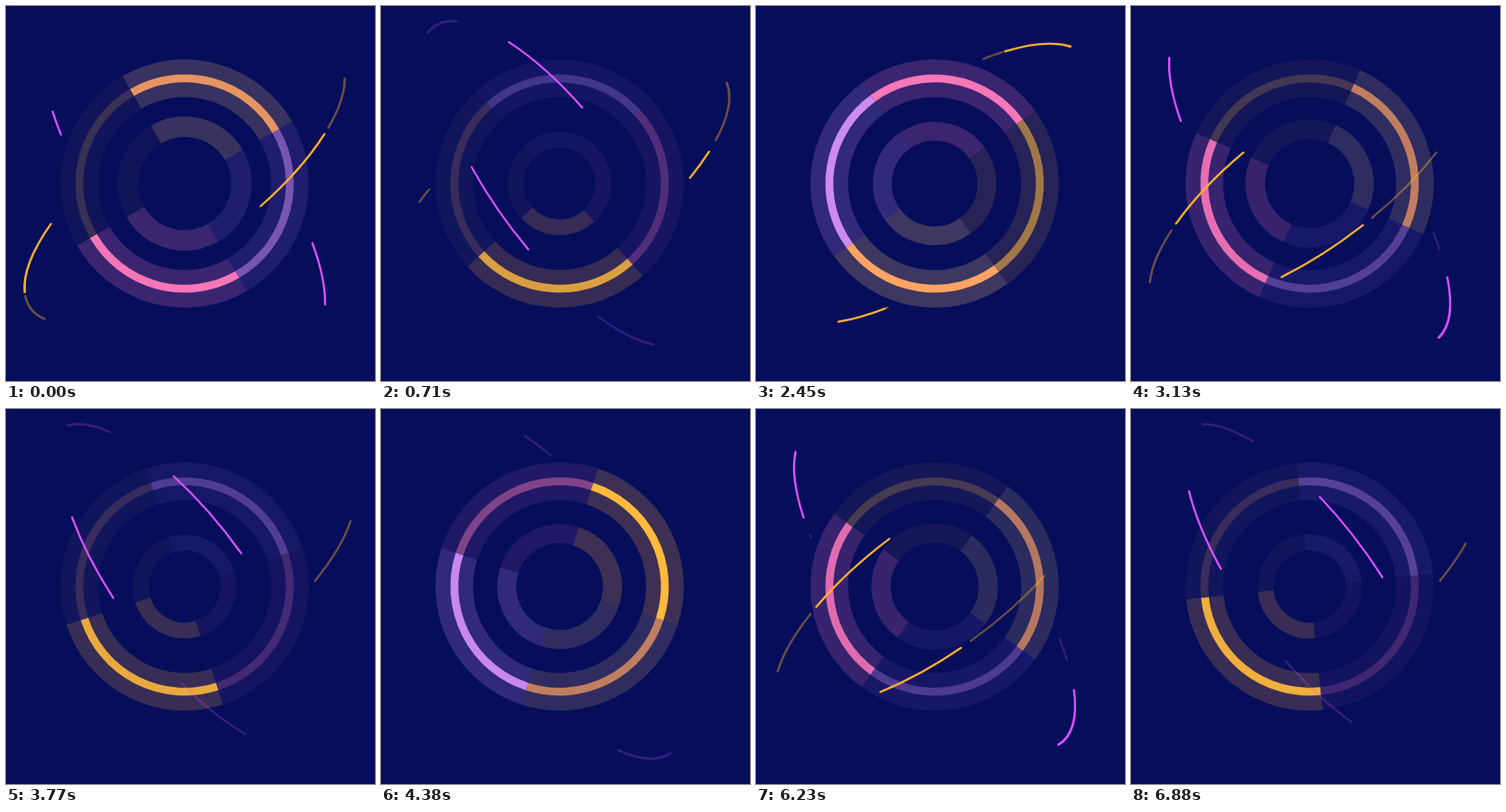
Animation of 407 by 414 pixels, one loop 6950 ms. Source, as an HTML page with a canvas:

```html
<!DOCTYPE html>
<html lang="en">
<head>
<meta charset="utf-8">
<title>Orbit loader</title>
<style>
  html, body { margin: 0; width: 100%; height: 100%; overflow: hidden; background: #060e5b; }
  canvas { display: block; width: 407px; height: 414px; }
</style>
</head>
<body>
<canvas id="stage"></canvas>
<script>
const W = 407, H = 414, CX = 197, CY = 196;
const LOOP = 6950, CYCLE = 180, BACK = '#060e5b';
const canvas = document.getElementById('stage');
const ctx = canvas.getContext('2d');
const dpr = window.devicePixelRatio || 1;
canvas.width = W * dpr;
canvas.height = H * dpr;

const rad = deg => deg * Math.PI / 180;
const mod = (a, b) => ((a % b) + b) % b;
const clamp = x => Math.min(1, Math.max(0, x));
const ease = x => (1 - Math.cos(Math.PI * x)) / 2;

// Quarter arcs in clockwise order; low is the tick at which each is faintest
const arcs = [
  { color: '#ffa463', band: '#ffc878', low: 46 },
  { color: '#cc8bf1', band: '#cc8bf1', low: 28.5 },
  { color: '#f777b9', band: '#f777b9', low: 57.5 },
  { color: '#ffb93c', band: '#ffa83c', low: 0 }
];

// Tilted orbits; each carries two streaks half a turn apart
const orbits = [
  { x: 188.6, y: 201.3, a: 221, b: 82, tilt: 233.7, color: '#d951ff', faint: 0.22, near: 0, far: 8, lag: 6 },
  { x: 191.7, y: 186.3, a: 217, b: 83, tilt: -36.2, color: '#ffb12a', faint: 0.4, near: 43, far: 35, lag: 0 }
];

// Eased progress from 0 to 1 between two ticks, shaped by handles p and q
function travel(u, from, to, p, q) {
  const x = clamp((u - from) / (to - from)), y = 1 - x;
  return 3 * p * y * y * x + 3 * q * y * x * x + x * x * x;
}

// One tick turns the rings by 6 degrees; the pace drops slightly over the loop
const ticks = t => 0.0594 * t + 3.4 * Math.sin(Math.PI * t / LOOP);

function ring(inner, outer, start, color, alpha) {
  ctx.strokeStyle = color;
  ctx.globalAlpha = alpha;
  ctx.lineWidth = outer - inner;
  ctx.beginPath();
  ctx.arc(CX, CY, (inner + outer) / 2, start, start + Math.PI / 2);
  ctx.stroke();
}

function drawRings(tick) {
  const turn = rad(tick * 360 / CYCLE);
  const size = 65.8 + 6.1 * Math.cos(2 * turn + 0.33) + 3.84 * Math.cos(turn + 0.9);
  ctx.lineCap = 'butt';
  arcs.forEach(({ color, band, low }, i) => {
    const start = rad(tick * 6 - 120 + i * 90);
    const away = Math.abs(mod(tick - low + CYCLE / 2, CYCLE) - CYCLE / 2);
    const alpha = 0.2 + 0.8 * ease(clamp(away / 60));
    ring(95.5, 111.7, start, band, alpha * 0.22);
    ring(111.7, 120.5, start, color, alpha);
    ring(120.5, 137, start, band, alpha * 0.22);
    ring(size * 0.696, size, start, band, alpha * 0.22);
  });
}

// Part of an orbit; the flattened stroke is thinner along the long sides
function trace(o, from, to, alpha) {
  if (to - from < 0.002) return;
  const squash = 0.8, angle = f => rad(-56 + 292 * f);
  ctx.save();
  ctx.translate(o.x, o.y);
  ctx.rotate(rad(o.tilt));
  ctx.scale(1, squash);
  ctx.globalAlpha = alpha;
  ctx.beginPath();
  ctx.ellipse(0, 0, o.a, o.b / squash, 0, angle(from), angle(to));
  ctx.stroke();
  ctx.restore();
}

function drawStreak(o, tick) {
  const u = mod(tick + 20, CYCLE) - 20, v = u - o.lag;
  ctx.strokeStyle = o.color;
  trace(o, travel(v, 9, 87, 0, 0.5), travel(v, 1, 81, 0, 0.48), o.faint);
  trace(o, travel(u, 0, 80, 0, 0.47), travel(u, -3, 73, 0.25, 0.37), 1);
}

function drawStreaks(tick) {
  ctx.lineCap = 'round';
  ctx.lineWidth = 2.8;
  for (const o of orbits) {
    drawStreak(o, tick + o.near);
    ctx.save();
    ctx.translate(2 * CX, 2 * CY);
    ctx.rotate(Math.PI);
    drawStreak(o, tick + o.far);
    ctx.restore();
  }
}

function draw(t) {
  const tick = Math.round(ticks(t));
  ctx.setTransform(dpr, 0, 0, dpr, 0, 0);
  ctx.globalAlpha = 1;
  ctx.fillStyle = BACK;
  ctx.fillRect(0, 0, W, H);
  drawRings(tick);
  drawStreaks(tick);
}

const begin = performance.now();
function loop() {
  draw((performance.now() - begin) % LOOP);
  requestAnimationFrame(loop);
}
loop();
</script>
</body>
</html>
```
